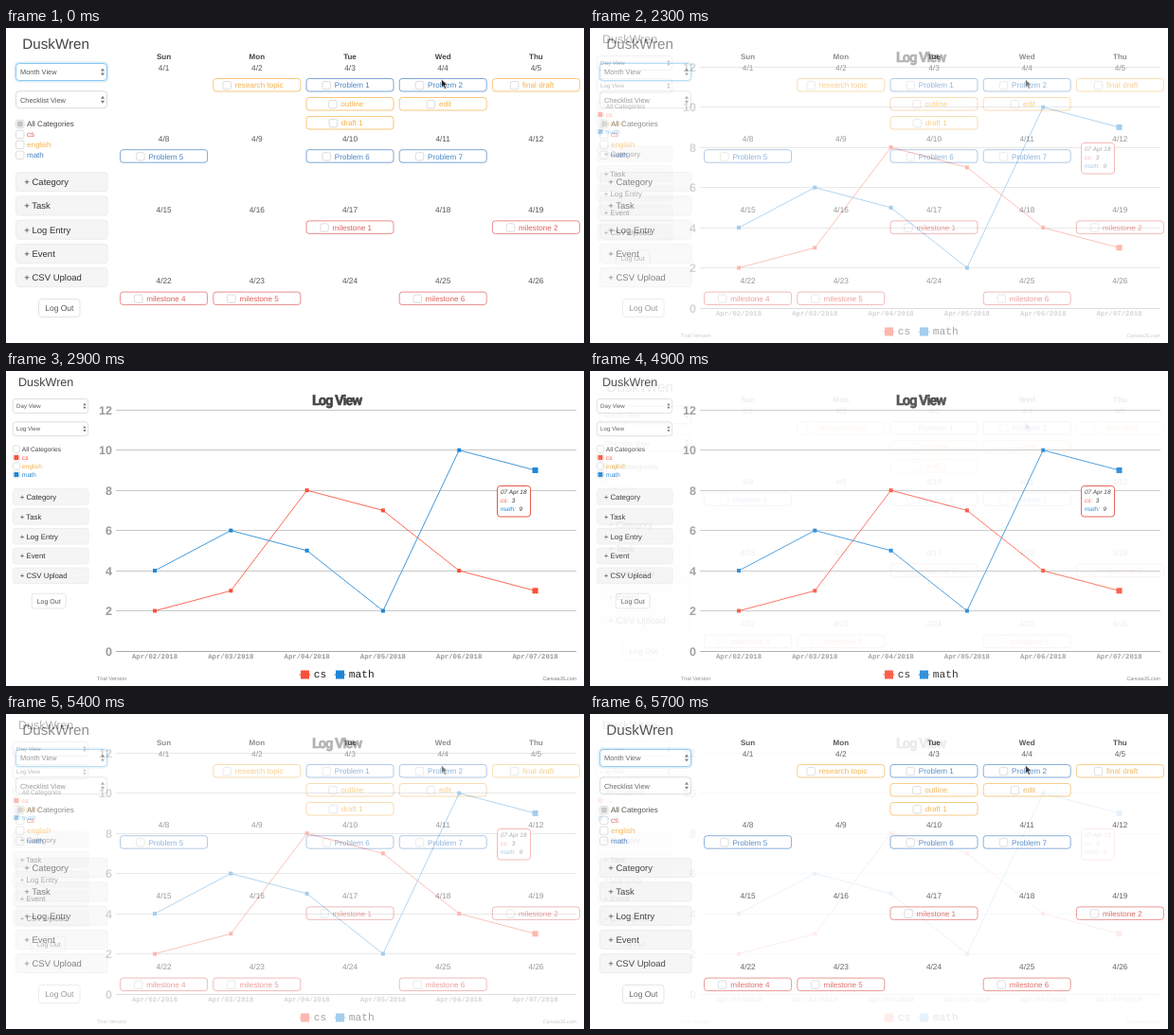
Recreate the animation shown at these times as an HTML page. Size 610 by 333 pixels, loop 5.8 s.

```html
<!DOCTYPE html>
<html lang="en">
<head>
<meta charset="utf-8">
<title>Planner views</title>
<style>
  html, body { margin: 0; width: 100%; height: 100%; overflow: hidden; background: #fff; }
  svg { display: block; width: 610px; height: 333px; }
  text { font-family: "Liberation Sans", Arial, sans-serif; text-rendering: geometricPrecision; white-space: pre; }
  .mono { font-family: "Liberation Mono", monospace; }
  .heavy { font: 700 15px Roboto, sans-serif; letter-spacing: -1.2px; }
</style>
</head>
<body>
<svg viewBox="0 0 610 333">
  <g id="calendar"></g>
  <g id="chart"></g>
</svg>
<script>
const RED = '#dd5f5b', ORANGE = '#f3b04a', BLUE = '#4682c4';
const CS = '#fa503a', MATH = '#1f86d6';
const calendar = document.getElementById('calendar');
const chart = document.getElementById('chart');

const text = (x, y, size, fill, label, extra = '') =>
  `<text x="${x}" y="${y}" font-size="${size}" fill="${fill}" ${extra}>${label}</text>`;
const rect = (x, y, w, h, fill, stroke = 'none', rx = 0, extra = '') =>
  `<rect x="${x}" y="${y}" width="${w}" height="${h}" rx="${rx}" fill="${fill}" stroke="${stroke}" ${extra}/>`;
const line = (x1, y1, x2, y2, stroke) =>
  `<path d="M${x1} ${y1}L${x2} ${y2}" stroke="${stroke}"/>`;
const square = (x, y, size, fill) => rect(x - size / 2, y - size / 2, size, size, fill);
const checkbox = (x, y) => rect(x, y, 8.5, 8.5, '#fff', '#d4d4d4', 2, 'stroke-width=".8"');
const MIDDLE = ' text-anchor="middle"', END = ' text-anchor="end"', BOLD = ' font-weight="bold"';
const paper = rect(0, 0, 610, 333, '#fff');

function select(y, label, focused) {
  const glow = focused ? rect(9.5, y - .5, 98, 20, 'none', '#dceefb', 4, 'stroke-width="2"') : '';
  return glow + rect(10.5, y + .5, 96, 18, '#fff', focused ? '#8cc8f0' : '#d9d9d9', 3.5) +
    text(15, y + 12.2, 7.4, '#555', label) +
    `<path d="M100 ${y + 8.5}l2-3 2 3zm0 2l2 3 2-3z" fill="#777"/>`;
}

// marks: fill colour of each of the four category checkboxes, or null
function sidebar(view, mode, focused, marks, colors) {
  const categories = ['All Categories', 'cs', 'english', 'math'];
  const actions = ['Category', 'Task', 'Log Entry', 'Event', 'CSV Upload'];
  return text(17.3, 21.6, 15.2, '#444', 'DuskWren') +
    select(37, view, focused) + select(66.3, mode, false) +
    categories.map((name, i) => {
      const y = 101.5 + 10.9 * i;
      return checkbox(10.5, y - 4.2) +
        (marks[i] ? rect(11.8, y - 2.9, 6, 6, marks[i], 'none', 1) : '') +
        text(22, y + 2.9, 8, colors[i], name);
    }).join('') +
    actions.map((name, i) => {
      const y = 162.7 + 25.25 * i;
      return rect(10.5, y - 10, 96.5, 20, '#f6f5f6', '#ececec', 3) +
        text(19.3, y + 3.4, 9.5, '#333', '+ ' + name);
    }).join('') +
    rect(34.5, 286.5, 43.5, 19, '#fff', '#e2e2e2', 3) +
    text(56.3, 299.2, 8.5, '#555', 'Log Out', MIDDLE);
}

// [column, row, slot, color, label]
const events = [
  [1, 0, 0, ORANGE, 'research topic'], [2, 0, 0, BLUE, 'Problem 1'],
  [2, 0, 1, ORANGE, 'outline'], [2, 0, 2, ORANGE, 'draft 1'],
  [3, 0, 0, BLUE, 'Problem 2'], [3, 0, 1, ORANGE, 'edit'],
  [4, 0, 0, ORANGE, 'final draft'], [0, 1, 0, BLUE, 'Problem 5'],
  [2, 1, 0, BLUE, 'Problem 6'], [3, 1, 0, BLUE, 'Problem 7'],
  [2, 2, 0, RED, 'milestone 1'], [4, 2, 0, RED, 'milestone 2'],
  [0, 3, 0, RED, 'milestone 4'], [1, 3, 0, RED, 'milestone 5'],
  [3, 3, 0, RED, 'milestone 6'],
];

function buildCalendar() {
  const columnX = column => 166.6 + 98.2 * column;
  let out = paper + sidebar('Month View', 'Checklist View', true,
    ['#c4c4c4'], ['#444', RED, ORANGE, BLUE]);
  ['Sun', 'Mon', 'Tue', 'Wed', 'Thu'].forEach((day, column) => {
    out += text(columnX(column), 33, 8, '#444', day, MIDDLE + BOLD);
    for (let row = 0; row < 4; row++)
      out += text(columnX(column), 44.6 + 75.2 * row, 8.3, '#555', '4/' + (1 + column + 7 * row), MIDDLE);
  });
  for (const [column, row, slot, color, label] of events) {
    const x = columnX(column), y = 53.5 + 75.2 * row + 20 * slot;
    out += rect(x - 46, y, 92, 13.5, '#fff', color, 3, 'stroke-opacity=".7"') +
      text(x + 2.3, y + 9.9, 8.1, color, label, MIDDLE + ' class="event"');
  }
  calendar.innerHTML = out;
  let extras = '';
  for (const label of calendar.querySelectorAll('.event'))
    extras += checkbox(label.getBBox().x - 12.8, label.getAttribute('y') - 7);
  extras += '<path d="M459.5 54v9l2-1.9 1.5 3.3 1.6-.7-1.5-3.2h2.9z" fill="#222" stroke="#fff" stroke-width=".6"/>';
  calendar.insertAdjacentHTML('beforeend', extras);
}

function buildChart() {
  const px = i => 157 + 80.3 * i, py = value => 296 - 21.23 * value;
  const series = (values, color) =>
    `<polyline points="${values.map((v, i) => [px(i), py(v)])}" fill="none" stroke="${color}" stroke-opacity=".85"/>` +
    values.map((v, i) => square(px(i), py(v), i === 5 ? 6 : 4, color)).join('');
  const legend = (x, name, color) =>
    line(x - 6, 321, x + 6, 321, color) + square(x, 321, 9, color) +
    text(x + 9.3, 324.4, 11.2, '#222', name, 'class="mono"');
  const tip = (y, name, value, color) =>
    text(522, y, 6.4, '#333', `<tspan fill="${color}">${name}:</tspan>\u00a0\u00a0${value}`, 'font-style="italic"');

  let out = paper + '<g transform="translate(-1.3 -1.4) scale(.826)">' +
    sidebar('Day View', 'Log View', false,
      [null, CS, null, MATH], ['#444', CS, ORANGE, MATH]) + '</g>';
  out += text(349, 35.8, 15, '#444', 'Log View', MIDDLE + ' class="heavy" stroke="#444" stroke-width=".5"');
  for (let value = 0; value <= 12; value += 2) {
    const y = Math.floor(py(value)) + .5;
    out += line(116, y, 602, y, value ? '#c8c8c8' : '#aaa') +
      text(112, py(value) + 4.5, 12.5, '#999', value, END + BOLD);
  }
  for (let i = 0; i < 6; i++)
    out += text(px(i), 304.3, 7.3, '#999', `Apr/0${i + 2}/2018`, MIDDLE + BOLD + ' class="mono"');
  out += series([2, 3, 8, 7, 4, 3], CS) + series([4, 6, 5, 2, 10, 9], MATH) +
    legend(315.5, 'cs', CS) + legend(352.5, 'math', MATH) +
    rect(518.5, 121.5, 35, 32.5, '#fff', '#e4574b', 3) +
    text(522, 130.3, 6.4, '#333', '07 Apr 18', 'font-style="italic"') +
    tip(139.3, 'cs', 3, CS) + tip(148.3, 'math', 9, MATH) +
    text(96, 326.8, 5.7, '#888', 'Trial Version') +
    text(602, 326.8, 5.3, '#777', 'CanvasJS.com', END);
  chart.innerHTML = out;
}

// Each cross-fade runs in ten hard steps of 100 ms.
const fade = (t, start) => Math.min(1, Math.max(0, Math.floor((t - start) / 100 + 1) / 10));

function render(now) {
  const t = now % 5800;
  chart.setAttribute('opacity', fade(t, 2000) - fade(t, 4900));
  requestAnimationFrame(render);
}

buildCalendar();
buildChart();
render(0);
</script>
</body>
</html>
```
